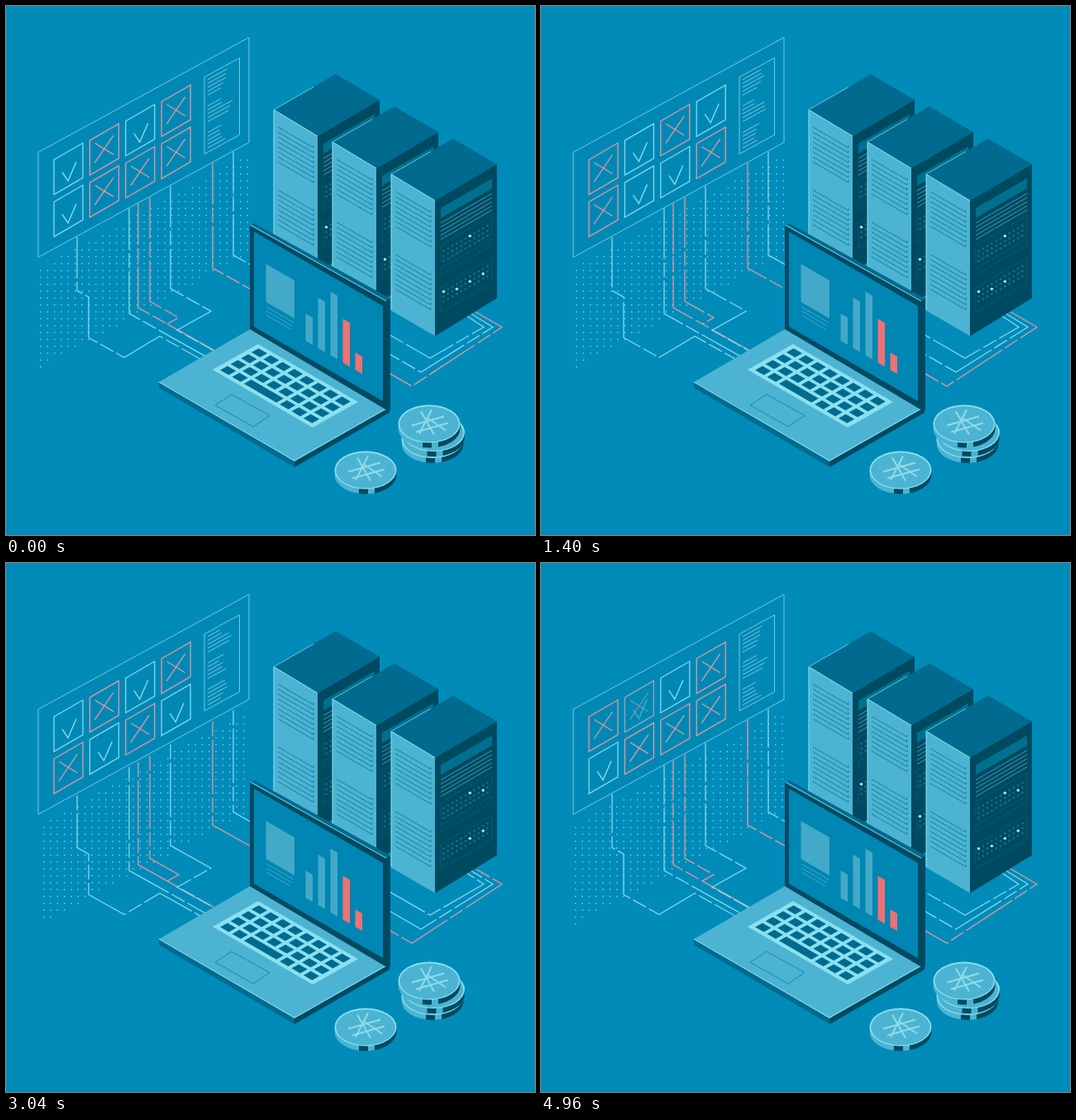
Recreate the animation shown at these times as an HTML page with a canvas. Size 640x640 px, loop 5000 ms.

```html
<!DOCTYPE html>
<html lang="en">
<head>
<meta charset="utf-8">
<title>Isometric data centre</title>
<style>
html, body { margin: 0; width: 100%; height: 100%; overflow: hidden; background: #008bb9; }
canvas { display: block; width: 100vw; height: 100vh; }
</style>
</head>
<body>
<canvas id="stage"></canvas>
<script>
const LOOP = 5000, BEAT = 1250, SLOPE = .545, ISO = .577;
const BG = '#008bb9', PALE = '#4cb4d2', LIGHT = '#83d9eb', RIM = '#8be0ee', SOFT = '#43a9c8',
      RED = '#ee7173', PINK = '#e2979f', EDGE = '#74c9de', MID = '#006b8f', DEEP = '#004a61';
const canvas = document.getElementById('stage');
const ctx = canvas.getContext('2d');

// Repeatable random number from 0 to 1
function noise(n) {
  const v = Math.sin(n * 12.9898 + 4.1) * 43758.5453;
  return v - Math.floor(v);
}
function trace(points, closed) {
  ctx.beginPath();
  points.forEach(([x, y]) => ctx.lineTo(x, y));
  if (closed) ctx.closePath();
}
function fill(points, color) {
  trace(points, true);
  ctx.fillStyle = color;
  ctx.fill();
}
function line(points, color, width = 1, closed = false) {
  trace(points, closed);
  ctx.strokeStyle = color;
  ctx.lineWidth = width;
  ctx.stroke();
}
// Parallelogram with upright sides whose other edges rise to the right
function slab(x, y, w, h, slope = SLOPE) {
  return [[x, y], [x + w, y - w * slope], [x + w, y - w * slope + h], [x, y + h]];
}

// A square grid of dots sliding right behind a slanted window
function drawDots(t) {
  const pitch = 8.34;
  ctx.fillStyle = '#79cfe4';
  for (let x = 33.67 + t / BEAT % 1 * pitch; x < 294; x += pitch) {
    if (x < 38.5) continue;
    const top = 318 - (x - 39) * SLOPE;
    const first = 320 + Math.ceil((top - 320) / pitch) * pitch;
    for (let y = first; y < top + 121; y += pitch) ctx.fillRect(x - .75, y - .75, 1.5, 1.5);
  }
}

// Route letters: d = down, r = right and down, l = left and down, u = right and up
const turns = { d: [0, 1], r: [1, .56], l: [-1, .56], u: [1, -.6] };
function route(x, steps) {
  let y = 305 - (x - 39) * SLOPE;
  const points = [[x, y]];
  for (const step of steps.split(' ')) {
    const [dx, dy] = turns[step[0]], size = +step.slice(1);
    points.push([x += dx * size, y += dy * size]);
  }
  return points;
}
const cables = [
  [LIGHT, route(86, 'd65 r14 d49 r43 u43 r54')],
  [LIGHT, route(149, 'd127 r96')],
  [PINK, route(160, 'd126 r95')],
  [PINK, route(174, 'd126 r35 l14')],
  [LIGHT, route(199, 'd124 r49 l41 r45')],
  [PINK, route(250, 'd127 r50')],
  [LIGHT, route(275, 'd125 r27')]
];
for (let i = 0; i < 3; i++) {
  const x = 491 + i * 11, y = 460 - i * 17;
  cables.push([i ? LIGHT : PINK,
    [[568 - i * 9, 370], [600 - i * 11, 388.5], [x, y], [460, y - (x - 460) * ISO]]]);
}
function drawCables(t) {
  ctx.setLineDash([66, 4, 18, 4]);
  ctx.lineDashOffset = 16 - t / BEAT * 92;
  for (const [color, path] of cables) line(path, color, 1.3);
  ctx.setLineDash([]);
}

function drawMark(x, y, tick, alpha) {
  const color = tick ? LIGHT : PINK;
  ctx.save();
  ctx.globalAlpha = alpha;
  ctx.translate(x, y);
  line(slab(0, 0, 35, 42, ISO), color, 1.3, true);
  if (tick) {
    line([[10, 15], [17, 25.5], [27, 2.5]], color, 1.4);
  } else {
    line([[6.5, 3.5], [28.5, 17]], color, 1.3);
    line([[6, 27], [28.5, -6]], color, 1.3);
  }
  ctx.restore();
}
function drawPanel(t) {
  const frame = slab(39, 177, 255, 127);
  fill(frame, '#0088b5');
  line(frame, EDGE, 1, true);
  for (let i = 0; i < 8; i++) {
    const col = i % 4, low = i > 3;
    // Upper row flips from right to left, lower row in its own later order
    const delay = low ? 140 * ((col + 2) % 4) - 100 : -20 * (col + 1);
    const tick = low ? col === 0 : col % 2 === 0;
    const beats = (t - delay) / BEAT, flip = Math.round(beats);
    const mix = Math.min(1, Math.max(0, .5 + (beats - flip) * BEAT / 40));
    const next = tick !== ((flip + (delay > 0)) % 2 !== 0);
    const x = 58 + col * 43.4, y = 186 - col * 23.4 + low * 51;
    drawMark(x, y, !next, 1 - mix);
    drawMark(x, y, next, mix);
  }
  line(slab(240, 86, 42.5, 93), EDGE, 1, true);
  for (let i = 0; i < 15; i++) {
    const y = 89 + Math.floor(i / 5) * 32 + i % 5 * 4.7;
    const w = (19 + 12 * noise(i)) * (.8 + .2 * Math.cos(2 * Math.PI * (t / BEAT - i * .13)));
    line([[244, y], [244 + w, y - w * SLOPE]], EDGE);
  }
}

function drawServer(x, y, t) {
  ctx.save();
  ctx.translate(x, y);
  fill([[0, 0], [75, -43], [128, -12], [53, 32]], MID);
  fill([[0, 0], [53.5, 32], [53.5, 196], [0, 165]], PALE);
  fill([[53, 32], [128, -12], [128, 150], [53, 196]], DEEP);
  line([[0, 164], [0, 0], [53, 32]], RIM, 1);
  line([[0, 0], [48, -27.5]], LIGHT, .8);
  for (let i = 0; i < 16; i++) {
    const top = (i < 8 ? 21 : 97) + i % 8 * 6;
    line([[5, top], [48, top + 25], [48, top + 22.5]], '#1480a3', 1);
  }
  fill(slab(60, 41, 62, 12, ISO), '#00708f');
  for (let i = 0; i < 5; i++) line(slab(60, 59 + i * 5, 62, 0, ISO), '#429fbb', .6);
  for (const [top, h] of [[86, 21], [114, 8], [137, 30]])
    line(slab(60, top, 62, h, ISO), '#00607e', .8, true);
  for (let i = 0; i < 66; i++) {
    const row = Math.floor(i / 11), dx = i % 11 * 5.3;
    const top = 93 + row * 6 + (row > 2 ? 31 : 0);
    const lit = noise(i) < .16 && (t / BEAT + noise(i + 99)) % 1 < .75;
    ctx.fillStyle = lit ? '#a8e9f3' : '#14718e';
    ctx.beginPath();
    ctx.arc(63.5 + dx, top - dx * ISO, lit ? 1.7 : 1.3, 0, 7);
    ctx.fill();
  }
  ctx.restore();
}

function drawKeys() {
  const at = (u, v) => [305 + u * 121 - v * 55, 409 + u * 70 + v * 31];
  const quad = (u, v, w, h) => [at(u, v), at(u + w, v), at(u + w, v + h), at(u, v + h)];
  fill(quad(0, 0, 1, 1), RIM);
  for (let row = 0; row < 4; row++) for (let col = 0; col < 8; col++) {
    const span = row === 3 && col === 2 ? 3 : 1;
    fill(quad(.04 + col * .119, .075 + row * .229, span * .119 - .033, .16), MID);
    col += span - 1;
  }
}
function drawLaptop() {
  fill([[185, 455], [349, 550], [349, 558], [185, 462]], MID);
  fill([[349, 550], [464, 486], [464, 492], [349, 558]], DEEP);
  fill([[185, 455], [297, 390], [463, 486], [349, 551]], PALE);
  line([[185, 455], [349, 550], [460, 487]], RIM);
  drawKeys();
  line([[273, 470], [319, 495.5], [299, 509], [253, 483]], '#1b87aa', 1, true);

  fill([[295, 266], [300, 263], [465, 354], [465, 489], [459, 488], [295, 391]], DEEP);
  fill([[295, 266], [300, 263], [465, 354], [460, 357]], MID);
  line([[296, 265], [460, 357]], LIGHT);
  fill(slab(300, 273, 156, 115, -ISO), '#0086b3');
  fill(slab(314.5, 312, 34.5, 46, -ISO), SOFT);
  for (let i = 0; i < 3; i++) line(slab(315, 364 + i * 5, 33 - i * 2, 0, -ISO), SOFT, .6);
  [33, 61, 77, 53, 21].forEach((h, i) =>
    fill(slab(362.5 + i * 15, 405 + i * 8.8 - h, 8.5, h, -ISO), i > 2 ? RED : SOFT));
}

function drawCoin(x, y) {
  const rx = 37.5, ry = 23, depth = 6;
  ctx.save();
  ctx.beginPath();
  ctx.ellipse(x, y + depth, rx, ry, 0, 0, Math.PI);
  ctx.ellipse(x, y, rx, ry, 0, Math.PI, 0);
  ctx.clip();
  ctx.fillStyle = PALE;
  ctx.fill();
  ctx.fillStyle = DEEP;
  ctx.fillRect(x - 8, y, 11, 40);
  ctx.fillRect(x + 11, y, 30, 40);
  ctx.restore();
  ctx.beginPath();
  ctx.ellipse(x, y, rx, ry, 0, 0, 7);
  ctx.fillStyle = RIM;
  ctx.fill();
  ctx.beginPath();
  ctx.ellipse(x, y + .3, rx - 1.7, ry - 1.5, 0, 0, 7);
  ctx.fillStyle = PALE;
  ctx.fill();
  // Currency sign: three slanted legs under two bars
  const bars = [[-21, 2, 18, -9], [-16, 10, 23, -1]];
  const legs = [[-10, -15, 6, 13], [3, -17, -12, 12], [-2, -7, 20, 8]];
  for (const [a, b, c, d] of [...bars, ...legs])
    line([[x + a, y + b], [x + c, y + d]], '#8edbe8', 2);
}

function draw(t) {
  const ratio = window.devicePixelRatio || 1;
  const w = Math.round(innerWidth * ratio), h = Math.round(innerHeight * ratio);
  if (canvas.width !== w || canvas.height !== h) {
    canvas.width = w;
    canvas.height = h;
  }
  ctx.setTransform(w / 640, 0, 0, h / 640, 0, 0);
  ctx.fillStyle = BG;
  ctx.fillRect(0, 0, 640, 640);
  drawDots(t);
  drawCables(t);
  drawPanel(t);
  for (let i = 0; i < 3; i++) drawServer(324 + i * 71, 125.5 + i * 39, t);
  drawLaptop();
  drawCoin(516, 524);
  drawCoin(517.5, 516);
  drawCoin(512, 505.5);
  drawCoin(435, 561.5);
}

const start = performance.now();
function tick() {
  draw((performance.now() - start) % LOOP);
  requestAnimationFrame(tick);
}
tick();
</script>
</body>
</html>
```
